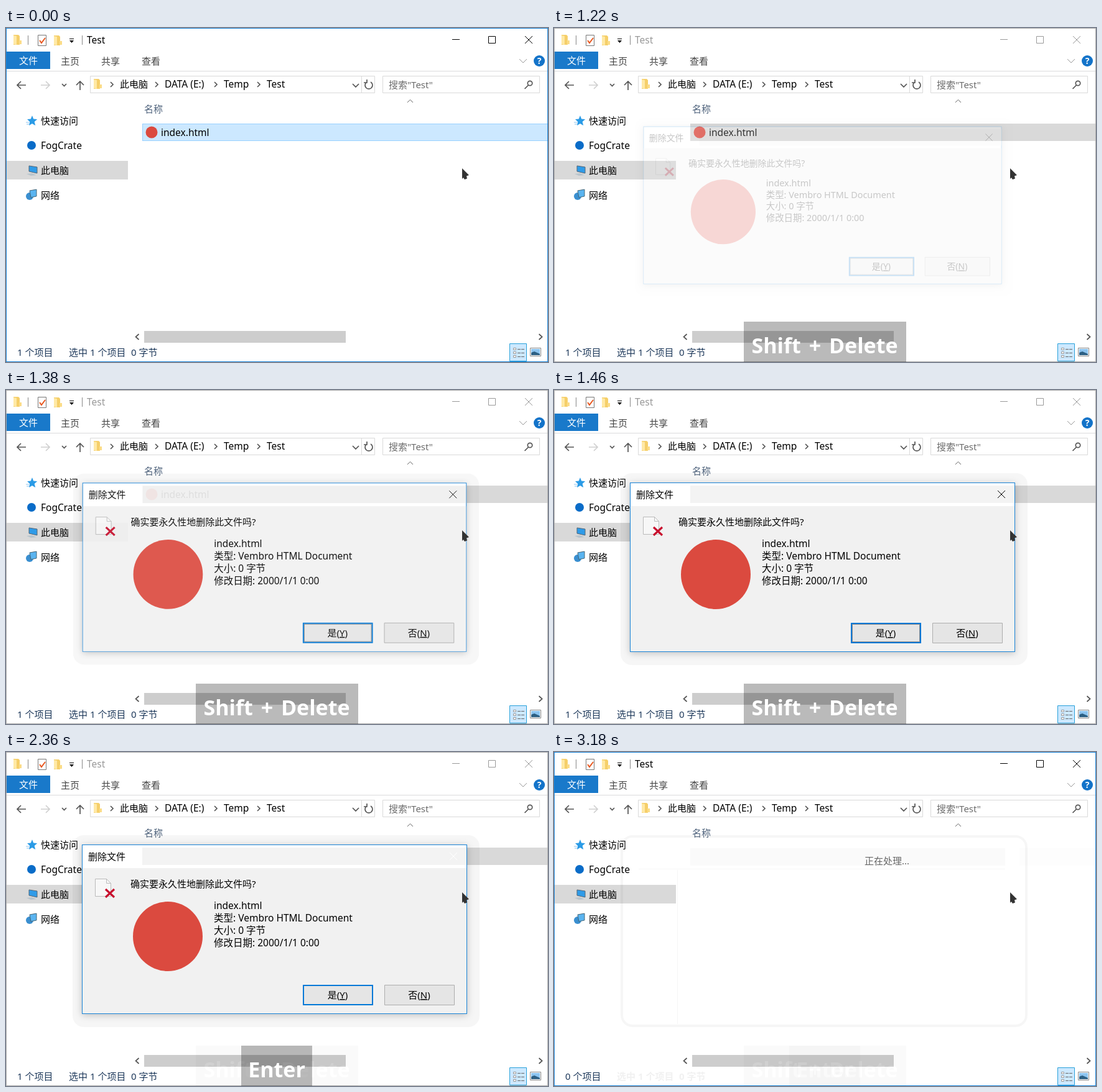
An HTML page for the animation above (3670 ms loop, 871 by 538 pixels).

```html
<!DOCTYPE html>
<html lang="zh-CN">
<meta charset="utf-8">
<title>Shift + Delete</title>
<style>
  html, body { margin: 0; width: 100%; height: 100%; overflow: hidden; background: #fff }
  svg { display: block; font: 15px 'Noto Sans', 'Noto Sans CJK SC', 'Noto Sans CJK', sans-serif }
  .latin { font-size: 15.5px }
  .line { fill: none; stroke: #000 }
  .nav { fill: none; stroke: #555; stroke-width: 1.7 }
  .box { fill: #fff; stroke: #d9d9d9 }
  .muted { fill: #4c607a }
  .status { fill: #1e395b }
  .key { font-size: 34px; font-weight: 700; text-anchor: middle; word-spacing: 4px; fill: #fff }
  .inactive #caption { fill: #999 }
  .inactive #controls { stroke: #999 }
  .inactive #border { stroke: #aaa }
  .inactive #row { fill: #d9d9d9; stroke: #d9d9d9 }
  #frame { filter: drop-shadow(0 2px 6px rgba(0, 0, 0, .22)) }
</style>
<svg id="stage" width="871" height="538" viewBox="0 0 871 538">
  <defs>
    <g id="folder">
      <path d="M0 0h8l2 2v14H0z" fill="#f5cf6a"/>
      <path d="M0 1l5 1v14l-5-1z" fill="#ffe9a6"/>
      <path d="M9 9h4v6H9z" fill="#fbdc87"/>
    </g>
    <path id="chevron" d="M-2-4L2 0L-2 4"/>
    <path id="cross" d="M-6-6L6 6M6-6L-6 6"/>
  </defs>
  <rect width="871" height="538" fill="#fff"/>

  <!-- title bar -->
  <use href="#folder" x="12" y="11"/>
  <use href="#folder" x="77" y="12"/>
  <path class="line" style="stroke:#888" d="M35.5 12v15M122.500 12v15"/>
  <path d="M51.500 11.500h13v17h-13z" fill="#fff" stroke="#777"/>
  <path d="M54 20l3 4l6-8" fill="none" stroke="#e8561c" stroke-width="2"/>
  <path d="M102 17.500h7" class="line"/>
  <path d="M102 20h7l-3.500 4z"/>
  <text id="caption" class="latin" x="130" y="25">Test</text>
  <g id="controls" class="line">
    <path d="M717 18.500h12M775.500 13.500h11v11h-11z"/>
    <use href="#cross" x="840" y="19"/>
  </g>

  <!-- ribbon tabs -->
  <path d="M1 38h70v28H1z" fill="#1979ca"/>
  <text x="21" y="58" fill="#fff">文件</text>
  <g fill="#444">
    <text x="88" y="59">主页</text>
    <text x="153" y="59">共享</text>
    <text x="218" y="59">查看</text>
  </g>
  <path class="line" style="stroke:#999" d="M825 50l6 6l6-6"/>
  <circle cx="857" cy="53" r="9" fill="#1373c9"/>
  <text x="857" y="58" fill="#fff" font-size="14" font-weight="700" text-anchor="middle">?</text>
  <path d="M1 69.500h869" stroke="#dadbdc"/>

  <!-- address bar -->
  <g class="nav">
    <path d="M32 92H18M24 86l-6 6l6 6M119 100V86M113 92l6-6l6 6"/>
    <path d="M56 92h14M64 86l6 6l-6 6" stroke="#d0d0d0"/>
    <path d="M90 90l3.500 3.500l3.500-3.500"/>
  </g>
  <path class="box" d="M135.500 77.500h457v27h-457zM571.500 78v27"/>
  <path class="box" d="M605.500 77.500h252v27h-252z"/>
  <use href="#folder" x="141" y="82"/>
  <g class="nav">
    <use href="#chevron" x="170" y="91"/>
    <use href="#chevron" x="242" y="91"/>
    <use href="#chevron" x="337" y="91"/>
    <use href="#chevron" x="406" y="91"/>
    <path d="M557 90l5 5l5-5M586 87a6 6 0 1 1-6 0M580 83v5h-5"/>
    <circle cx="842" cy="89" r="3.700"/>
    <path d="M839.500 92l-6 6"/>
  </g>
  <text x="183" y="96">此电脑</text>
  <g class="latin">
    <text x="255" y="96">DATA (E:)</text>
    <text x="350" y="96">Temp</text>
    <text x="419" y="96">Test</text>
  </g>
  <text x="615" y="97" fill="#6d6d6d">搜索"Test"</text>

  <!-- sidebar -->
  <path d="M1 214h195v30H1z" fill="#d9d9d9"/>
  <path d="M42 141l2.200 5.500l6 .5l-4.500 4l1.500 6l-5.200-3l-5 3l1.200-6l-4.200-4l5.800-.5z" fill="#2b9be6"/>
  <path d="M32 152h5M33 155h4" stroke="#8cc4ee"/>
  <circle cx="41" cy="189" r="7" fill="#0a6cc8"/>
  <path d="M37 222l13 2v10l-13-3z" fill="#2f9be8" stroke="#567"/>
  <path d="M33 235l9-1l7 3l-9 1z" fill="#b8c4cc"/>
  <circle cx="38" cy="271" r="6" fill="#3a8fd0"/>
  <path d="M38 262l11-2v11l-9 2z" fill="#5ab4f0" stroke="#467"/>
  <text x="56" y="155">快速访问</text>
  <text x="56" y="195" class="latin">FogCrate</text>
  <text x="56" y="235">此电脑</text>
  <text x="56" y="275">网络</text>

  <!-- file list -->
  <text class="muted" x="222" y="136">名称</text>
  <path d="M645 120l4.500-4.500l4.500 4.500" class="line" style="stroke:#666"/>
  <g id="file">
    <rect id="row" x="219.500" y="154.500" width="651" height="27" fill="#cce8ff" stroke="#99d1ff"/>
    <circle cx="234" cy="168" r="9.500" fill="#db4a3f"/>
    <text class="latin" x="249" y="174">index.html</text>
    <text class="status" x="101" y="528">选中 1 个项目</text>
    <text class="status" x="201" y="528">0 字节</text>
  </g>
  <g id="empty">
    <path d="M219 155h506v28H219z" fill="#fafafa"/>
    <path d="M748 155h122v28H748z" fill="#fdfdfd"/>
    <path d="M136 188.500h589" stroke="#f7f7f7"/>
    <text x="499" y="181" fill="#666">正在处理...</text>
    <g fill="#f1f1f1" font-weight="700">
      <text x="101" y="528">选中 1 个项目</text>
      <text x="201" y="528">0 字节</text>
    </g>
  </g>

  <!-- scroll bar and status bar -->
  <path d="M222 488h324v19H222z" fill="#cdcdcd"/>
  <path class="nav" d="M213.500 493l-5 4.500l5 4.500M856.500 493l5 4.500l-5 4.500"/>
  <text id="count" class="status" x="18" y="528"></text>
  <path d="M809.500 508.500h27v28h-27z" fill="#cce8ff" stroke="#26a0da"/>
  <path d="M815.500 515.500h4v3h-4zM815.500 521.500h4v3h-4zM815.500 527.500h4v3h-4z" fill="#fff" stroke="#999"/>
  <path d="M822 517.500h11M822 523.500h11M822 529.500h11" stroke="#666" stroke-dasharray="5 1"/>
  <path d="M842.500 515.500h17v13h-17z" fill="#fff" stroke="#888"/>
  <path d="M844 517h14v10h-14z" fill="#8cc4f0"/>
  <path d="M844 523l5-2l9 4v2h-14z" fill="#2c5f83"/>
  <rect id="border" x=".5" y=".5" width="870" height="537" fill="none" stroke="#1883d7"/>

  <!-- faint trace around the dialog -->
  <g id="trace" fill="none" stroke="#000" stroke-opacity=".035">
    <rect x="109" y="136" width="650" height="305" rx="17" stroke-width="4"/>
    <path d="M198.500 190v248"/>
  </g>

  <!-- confirmation dialog -->
  <g id="dialog">
    <rect x="107" y="134" width="654" height="309" rx="18" fill-opacity=".035"/>
    <rect id="frame" x="122.500" y="149.500" width="618" height="272" fill="#fff" stroke="#1883d7"/>
    <path d="M123 187h617v234H123z" fill="#f1f1f1"/>
    <path d="M219 154h521v28H219z" fill="#f3f3f3"/>
    <text x="132" y="174">删除文件</text>
    <use id="close" href="#cross" x="719" y="168" fill="none" stroke="#000"/>
    <path d="M143.500 204.500h18l7 7v21h-25z" fill="#f7f7f7" stroke="#bbb"/>
    <path d="M161.500 204.500v7h7" fill="none" stroke="#bbb"/>
    <path d="M160 221l14 13M174 221l-14 13" stroke="#c8102e" stroke-width="3.200"/>
    <text x="200" y="218">确实要永久性地删除此文件吗?</text>
    <circle cx="260" cy="297" r="56" fill="#db4a3f"/>
    <g class="latin">
      <text x="334" y="253">index.html</text>
      <text x="334" y="273">类型: Vembro HTML Document</text>
      <text x="334" y="293">大小: 0 字节</text>
      <text x="334" y="313">修改日期: 2000/1/1 0:00</text>
    </g>
    <path d="M478 376h111v31H478z" fill="#e5e5e5" stroke="#0078d7" stroke-width="2"/>
    <path id="focus" d="M479.500 377.500h108v28h-108z" fill="none" stroke="#333" stroke-dasharray="1 1"/>
    <path d="M608.500 375.500h112v32h-112z" fill="#e5e5e5" stroke="#adadad"/>
    <g text-anchor="middle">
      <text x="533" y="397">是(<tspan text-decoration="underline">Y</tspan>)</text>
      <text x="664" y="397">否(<tspan text-decoration="underline">N</tspan>)</text>
    </g>
  </g>

  <path d="M733 226l11 11l-4 1.500l1 4l-4 1.500l-2-3l-2 2z" fill="#333"/>

  <!-- pressed keys -->
  <g id="shiftDelete">
    <path d="M305 473h261v65H305z" fill-opacity=".27"/>
    <text class="key" x="435" y="524">Shift + Delete</text>
  </g>
  <g id="enter">
    <path d="M378 473h114v65H378z" fill-opacity=".27"/>
    <text class="key" x="435" y="524">Enter</text>
  </g>
</svg>
<script>
  const LOOP = 3670, OPEN = 1190, CLOSE = 2360, EMPTY = 2460, END = 3180;
  const $ = id => document.getElementById(id);
  const progress = (t, start, length) => Math.min(1, Math.max(0, (t - start) / length));
  const fade = (id, alpha) => $(id).setAttribute('opacity', alpha);

  // A key label shows at full strength, then leaves a faint trace.
  const keyAlpha = (t, from, to) => t < from ? 0 : t < to ? 1 : .07;

  function draw(t) {
    const opening = 1 - progress(t, OPEN, 270);
    const closing = progress(t, CLOSE + 20, 130);
    const scale = (1 - .1 * opening ** 3) * (1 - .044 * closing);
    const empty = t >= EMPTY;

    $('stage').classList.toggle('inactive', t >= OPEN && t < CLOSE + 50);
    fade('file', empty ? 0 : 1);
    fade('empty', empty ? 1 : 0);
    $('count').textContent = (empty ? 0 : 1) + ' 个项目';

    fade('trace', empty ? 1 : 0);
    fade('dialog', t >= END ? 0 : (1 - opening ** 2) * (1 - .94 * closing));
    $('dialog').setAttribute('transform',
      `translate(431.5 285.5) scale(${scale}) translate(-431.5 -285.5)`);
    $('close').setAttribute('stroke', t < CLOSE ? '#000' : '#fff');
    fade('focus', t < CLOSE ? 1 : 0);

    fade('shiftDelete', keyAlpha(t, 1110, 1920));
    fade('enter', keyAlpha(t, CLOSE, END));
  }

  const start = performance.now();
  (function tick() {
    draw((performance.now() - start) % LOOP);
    requestAnimationFrame(tick);
  })();
</script>
</html>
```
